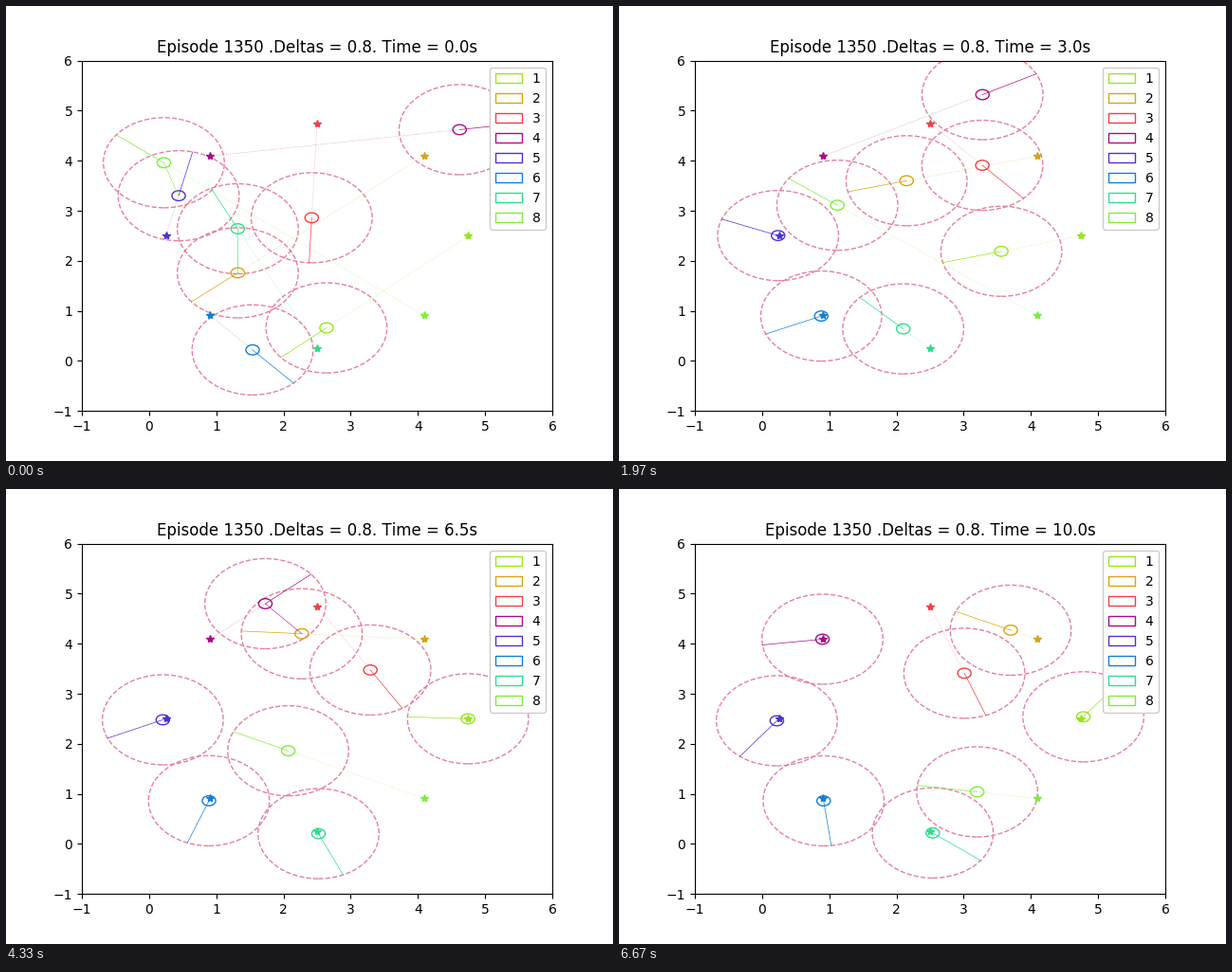
A matplotlib script that plays this animation: 640x480 px, repeating every 6710 ms.

```python
import itertools

import matplotlib.pyplot as plt
import numpy as np
from matplotlib.animation import FuncAnimation
from matplotlib.patches import Circle

plt.rcParams["text.kerning_factor"] = 6

STEPS, DT, LOOP_MS = 200, 0.05, 6710
FRAMES = 2 * (STEPS + 1)  # two frames per simulation step
END = STEPS * DT
BODY, SENSE, LINK = 0.1, 0.9, 1.0
CRUISE, DRIFT = 0.33, 0.05

COLORS = ["#96e61e", "#d6a512", "#f04046", "#aa0c88",
          "#5030d2", "#1080d6", "#2cde8c", "#80ec3c"]

# Stops (time, x, y); an agent whose list ends early cruises to its goal
STOPS = [
    [(0, 2.64, 0.66), (1.1, 2.9, 1.49), (2.95, 3.56, 2.19)],
    [(0, 1.32, 1.76), (1.1, 1.65, 2.45), (2.95, 2.15, 3.6),
     (8.45, 2.75, 4.2), (END, 3.7, 4.27)],
    [(0, 2.42, 2.86), (1.1, 3.02, 3.5), (4.1, 3.26, 3.93),
     (8.45, 3.19, 3.19), (END, 3.01, 3.41)],
    [(0, 4.62, 4.62), (2.95, 3.28, 5.32), (6.5, 1.73, 4.8)],
    [(0, 0.44, 3.3), (1.1, 0.49, 2.97)],
    [(0, 1.54, 0.22), (1.1, 1.24, 0.68)],
    [(0, 1.32, 2.64), (1.1, 1.52, 1.74), (2.95, 2.1, 0.64)],
    [(0, 0.22, 3.96), (1.1, 0.47, 3.46), (2.95, 1.12, 3.11),
     (6.5, 2.07, 1.86), (END, 3.2, 1.04)],
]


def polar(r, angle):
    return r * np.array([np.cos(angle), np.sin(angle)])


class Agent:
    def __init__(self, index, stops, color):
        self.color = color
        self.angle = index * np.pi / 4
        self.goal = 2.5 + polar(2.25, self.angle)
        last, *spot = stops[-1]
        arrives = last < END
        if arrives:
            trip = np.hypot(*(self.goal - spot)) / CRUISE
            stops = stops + [(last + trip, *self.goal)]
        keys = np.array(stops)
        self.times, self.points = keys[:, 0], keys[:, 1:]
        self.slopes = np.gradient(self.points, self.times, axis=0)
        if arrives:
            self.slopes[-1] = 0

    def position(self, t):
        """Cubic Hermite path, then a slight drift around the goal."""
        T, P, M = self.times, self.points, self.slopes
        k = min(np.searchsorted(T, t, side="right"), len(T) - 1) - 1
        h = T[k + 1] - T[k]
        s = min((t - T[k]) / h, 1)
        path = ((1 + 2 * s) * (1 - s) ** 2 * P[k]
                + s * (1 - s) ** 2 * h * M[k]
                + s * s * (3 - 2 * s) * P[k + 1]
                + s * s * (s - 1) * h * M[k + 1])
        settled = np.clip(t - T[-1], 0, 1)
        return path + polar(DRIFT * settled, self.angle + np.sin(2 * t))

    def add_artists(self, ax, label):
        def circle(radius, **style):
            return ax.add_patch(Circle((0, 0), radius, fill=False, **style))

        ax.plot(*self.goal, "*", color=self.color, ms=6)
        self.body = circle(BODY, ec=self.color, label=label)
        self.range = circle(SENSE, ec="#e2829b", ls="--")
        self.heading = segment(self.color)
        self.route = segment(self.color, ls=":", alpha=0.5)

    def move(self, t):
        self.pos = p = self.position(t)
        self.body.center = self.range.center = tuple(p)
        away = p - self.goal
        tip = p + SENSE * away / max(np.hypot(*away), 1e-9)
        self.heading.set_data(*zip(p, tip))
        self.route.set_data(*zip(p, self.goal))


def segment(color, **style):
    return ax.plot([], [], color=color, lw=0.5, **style)[0]


fig, ax = plt.subplots(figsize=(6.4, 4.8), dpi=100)
ax.set(xlim=(-1, 6), ylim=(-1, 6))
title = ax.set_title("")

agents = [Agent(i, *spec) for i, spec in enumerate(zip(STOPS, COLORS))]
for i, agent in enumerate(agents, 1):
    agent.add_artists(ax, str(i))
links = [(a, b, segment(b.color, alpha=0.8))
         for a, b in itertools.combinations(agents, 2)]
ax.legend(handles=[a.body for a in agents], loc="upper right", framealpha=1)


def update(frame):
    t = min((frame + 1) // 2, STEPS) * DT
    for agent in agents:
        agent.move(t)
    for a, b, line in links:
        line.set_data(*zip(a.pos, b.pos))
        line.set_visible(np.hypot(*(a.pos - b.pos)) < LINK)
    title.set_text(f"Episode 1350 .Deltas = 0.8. Time = {t + 1e-9:.1f}s")
    return []


anim = FuncAnimation(fig, update, frames=FRAMES, interval=LOOP_MS / FRAMES,
                     init_func=lambda: update(0), repeat=True, repeat_delay=0)
plt.show()
```
